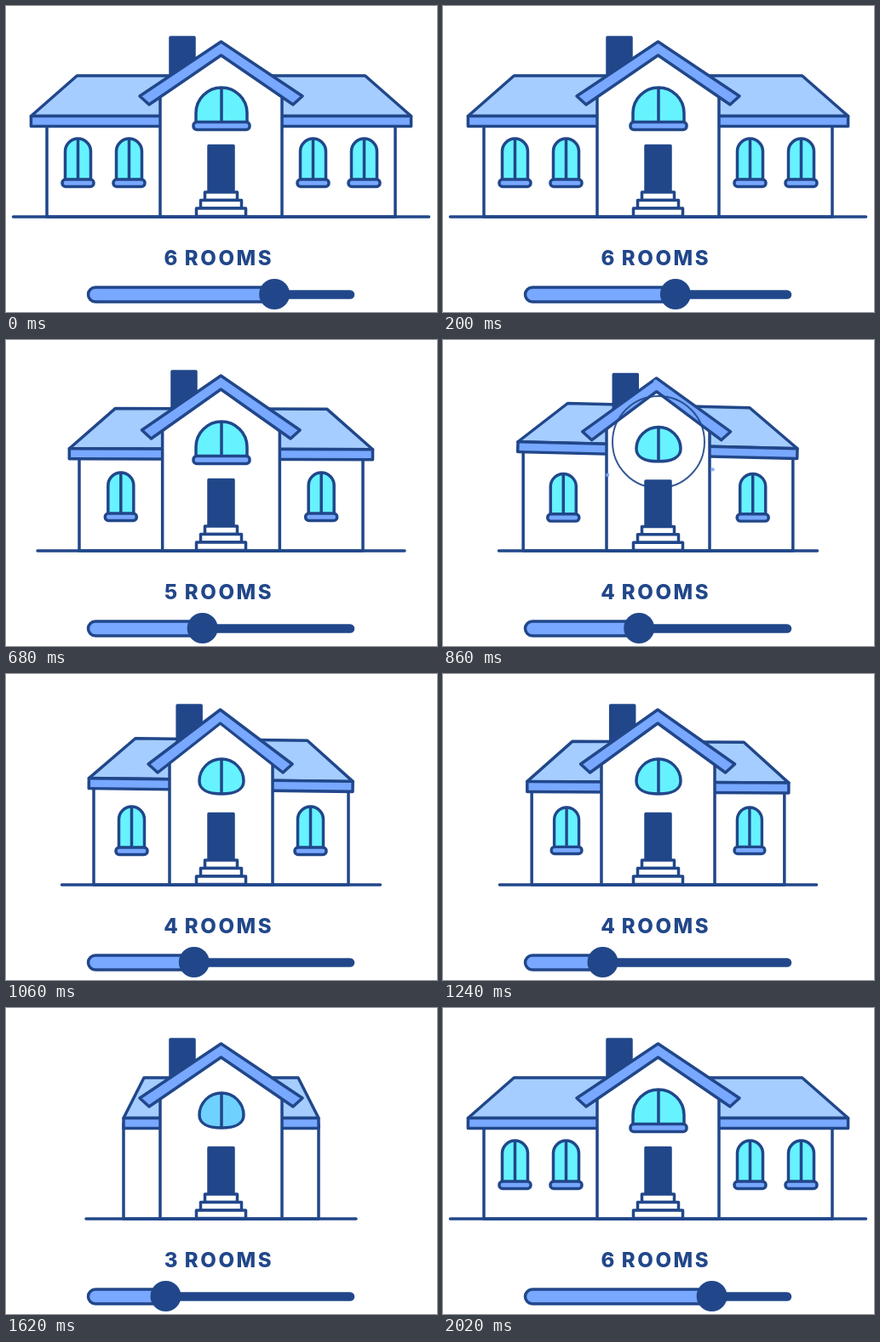
Write an HTML page that moves like this. It is 506 px wide and 360 px high and loops after 2.4 s.

```html
<!DOCTYPE html>
<html lang="en">
<head>
<meta charset="utf-8">
<title>Rooms slider</title>
<style>
html, body { margin: 0; width: 100%; height: 100%; overflow: hidden; background: #fff; }
svg { display: block; width: 100vw; height: 100vh; }
text { font: 800 24px Inter, Lato, sans-serif; fill: #21478a; }
</style>
</head>
<body>
<svg id="stage" viewBox="0 0 506 360" stroke="#21478a" stroke-width="3.5" stroke-linejoin="round" stroke-linecap="round"></svg>
<script>
const LOOP = 2400, STEP = 520, CX = 252.5, FLOOR = 248;
const INK = '#21478a', ROOF = '#a5cdff', TRIM = '#78a8ff';
const wallHalf = [114.5, 149.5, 166.5, 204.5]; // for 3 to 6 rooms
const ringAt = [[410, 185], [253, 120], [158, 182]];

const mix = (a, b, p) => a + (b - a) * p;
const ramp = (t, a, b) => Math.min(1, Math.max(0, (t - a) / (b - a)));
const smooth = (t, a, b) => { const p = ramp(t, a, b); return p * p * (3 - 2 * p); };
const easeOut = (t, a, b) => 1 - (1 - ramp(t, a, b)) ** 2;

// Damped swing after a pop; lag delays its phase
function swing(u, lag) {
  const q = u - 210;
  return smooth(q, 0, 40) * (1 - ramp(q, 0, 310)) ** 2 * Math.sin(Math.PI * (q - lag) / 118);
}

const poly = (pts, fill) => `<polygon points="${pts.join(' ')}" fill="${fill}"/>`;
const rect = (x, y, w, h, fill, rx = 0) =>
  `<rect x="${x}" y="${y}" width="${w}" height="${h}" rx="${rx}" fill="${fill}"/>`;
const path = (d, fill = 'none', width = 3.5) => `<path d="${d}" fill="${fill}" stroke-width="${width}"/>`;
const scaled = (x, y, s, body) => s < 0.02 ? '' :
  `<g transform="translate(${x} ${y}) scale(${s})">${body}</g>`;

const sideWindow = (x, size, glass) => scaled(x, 184, size,
  path('M-15 22V-13a15 15 0 0 1 30 0V22z', glass) + path('M0-27V20') +
  rect(-18.5, 20, 37, 8.5, TRIM, 4));

const frontWindow = (arch, glass) =>
  scaled(253, 121, arch,
    path('M-30 18V5a30 30 0 0 1 60 0V18z', glass) + path('M0-24V16') +
    rect(-33, 15.5, 66, 9, TRIM, 4)) +
  scaled(253, 120, 1 - arch,
    path('M-26 6a26 26 0 0 1 52 0c0 10-10 15-26 15s-26-5-26-15z', glass) + path('M0-19V20'));

// rooms and coreRooms may be fractional while one house turns into the next
function house(rooms, coreRooms, u) {
  const extra = rooms - 3, low = ramp(rooms, 4, 3);
  const narrow = Math.max(0, 1 - Math.abs(coreRooms - 4));
  const tall = 0.15 * swing(u, 0), wide = 1 + 0.2 * swing(u, 90), sway = 8.2 * swing(u, 23);
  const tilt = sway + 0.7 * narrow, lift = -4 * sway - 5 * narrow;

  const k = Math.min(2, Math.floor(extra));
  const half = mix(wallHalf[k], wallHalf[k + 1], extra - k);
  const core = 71.5 - 11 * narrow;
  const wall = half * wide;
  const eave = (half + 5 * extra + 0.4 * extra ** 2) * wide;
  const ridge = eave - (54 - 30 * low) * wide;
  const g = (core + 24) * (1 + wide) / 2;
  const middle = (core + half) / 2, spread = 30 * ramp(rooms, 5, 6);
  const tint = low * (0.45 + 0.55 * Math.sin(Math.PI * ramp(u, 200, 480)));
  const glass = `rgb(${102 + 20 * tint},${242 - 73 * tint},255)`;

  const drop = tilt * Math.PI / 180 * wall;
  const walls = poly([CX - wall, FLOOR, CX - wall, 136 + lift - drop,
    CX + wall, 136 + lift + drop, CX + wall, FLOOR], '#fff');
  const windows = [-1, 1].map(side =>
    sideWindow(CX + side * (middle - spread) * wide, ramp(rooms, 3, 4), glass) +
    sideWindow(CX + side * (middle + spread) * wide, ramp(rooms, 5, 6), glass)).join('');
  const roof = poly([CX - eave, 129.5, CX - ridge, 82, CX + ridge, 82, CX + eave, 129.5], ROOF) +
    rect(CX - eave, 129.5, 2 * eave, 12, TRIM);
  const front = poly([CX - core, FLOOR, CX - core, 102, CX, 53, CX + core, 102, CX + core, FLOOR], '#fff');
  const gable = poly([0, 42, g, 106, g - 11, 116, 0, 58, 11 - g, 116, -g, 106], TRIM);
  const steps = [0, 1, 2].map(i =>
    rect(CX - 19 - 5 * i, 219 + 9.5 * i, 38 + 10 * i, 9.5, '#fff')).join('');

  return `<g transform="translate(0 ${FLOOR}) scale(1 ${1 + tall}) translate(0 ${-FLOOR})">` +
    walls + windows +
    `<g transform="translate(0 ${lift}) rotate(${tilt} ${CX} 110)">${roof}</g>` +
    rect(193 + 9 * narrow - 1.2 * tilt, 37, 28, 45, INK) + front +
    `<g transform="translate(${CX - 1.3 * tilt} ${-0.8 * sway})">${gable}</g>` +
    frontWindow(ramp(rooms, 4, 5), glass) +
    rect(238, 164.5, 29, 55, INK) + steps + '</g>';
}

function burst([x, y], u) {
  if (u < 230 || u > 420) return '';
  const r = 54 * easeOut(u, 230, 330);
  const sparks = [27, 147, 267].map(deg => {
    const a = deg * Math.PI / 180;
    return `<circle cx="${x + 1.32 * r * Math.cos(a)}" cy="${y + 1.32 * r * Math.sin(a)}" r="2.2" fill="${TRIM}" stroke="none"/>`;
  });
  return `<g opacity="${0.9 - 0.9 * smooth(u, 340, 420)}">
    <circle cx="${x}" cy="${y}" r="${r}" fill="none" stroke-width="2"/>${sparks.join('')}</g>`;
}

const label = (rooms, size) => `<g stroke="none">` +
  scaled(193.5, 296.5, size, `<text y="8.5" text-anchor="middle">${rooms}</text>`) +
  `<text x="209.8" y="305" letter-spacing="2.6">ROOMS</text></g>`;

const slider = x => path(`M${x} 339.5H404`, 'none', 10.5) +
  rect(96.5, 331, x - 96.5, 17, TRIM, 8.5) +
  `<circle cx="${x}" cy="339" r="18" fill="${INK}" stroke="none"/>`;

function draw(t) {
  const i = Math.min(2, Math.floor(t / STEP));
  const u = t - i * STEP - (i ? 0 : 40); // the first pop comes a little later
  const back = smooth(t, 1780, 2020);
  const count = p => mix(6 - i - p, 6, back);
  const rooms = count(smooth(u, 190, 290));
  const ground = 160 + 28.5 * (rooms - 3) - 1.5;
  const knob = 187.5 + 42.7 * (count(easeOut(t, i * STEP, i * STEP + 180)) - 3);
  const bump = 1 + 0.3 * Math.sin(Math.PI * ramp(u, 200, 340));

  stage.innerHTML = house(rooms, count(smooth(u, 100, 290)), u) +
    path(`M${CX - ground} ${FLOOR}H${CX + ground}`) +
    burst(ringAt[i], u) + label(Math.round(rooms), bump) + slider(knob);
}

const stage = document.getElementById('stage');
const begin = performance.now();
function tick() {
  draw((performance.now() - begin) % LOOP);
  requestAnimationFrame(tick);
}
tick();
</script>
</body>
</html>
```
